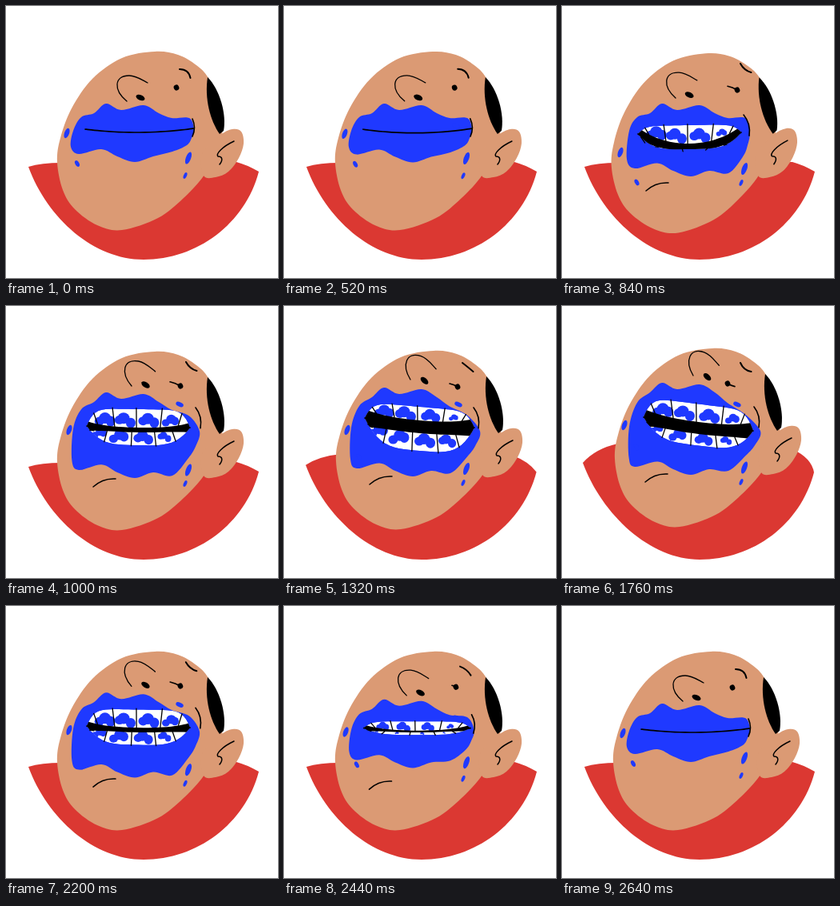
An HTML page with a canvas for the animation above (3.4 s loop, 340 px wide and 340 px high).

```html
<!DOCTYPE html>
<html lang="en">
<head>
<meta charset="utf-8">
<title>Foamy toothbrushing grin</title>
<style>
html, body { margin: 0; width: 100%; height: 100%; overflow: hidden; background: #fff; }
canvas { display: block; }
</style>
</head>
<body>
<canvas id="stage" width="340" height="340"></canvas>
<script>
const ctx = document.getElementById('stage').getContext('2d');
const LOOP = 3400, FRAME = 40;
const SKIN = '#db9a74', RED = '#db3832', BLUE = '#1f39ff', BLACK = '#000';

// shoulders: lift, spread | head: dx, dy, tilt | foam: lift above, drop below | corners: left, right
// jaws: upper arch, lower arch, sag of the gap, gap height | nose: x, y, tilt | eye: x, y, lash
// brow: x, y, bend | cheek: x, y, slant | chin: x, y | fleck: x, y
const closed = {
  shoulders: [0, 0], head: [0, 0, 0], foam: [0, 0], corners: [99, 154, 235, 153], jaws: [0, 0, 4.5, 0],
  nose: [151, 119, 0], eye: [213, 102, 0], brow: [217, 79, -7], cheek: [233, 141, 0], chin: [105, 231], fleck: [76, 159]
};
const opening = {
  ...closed, head: [-2, 6, 1.8], foam: [0, 18], corners: [95, 160, 224, 158], jaws: [10, 20, 18, 10],
  nose: [142, 115, 2], eye: [219, 105, -12], brow: [223, 72, 4], cheek: [227, 136, 7], fleck: [73, 183]
};
const grin = {
  shoulders: [.45, 0], head: [1, -1, 0], foam: [20, 18], corners: [101, 140, 238, 152], jaws: [20, 35, 5, 16],
  nose: [158, 92, 19], eye: [217, 101, -10], brow: [223, 71, 0], cheek: [237, 127, 6], chin: [107, 223], fleck: [79, 155]
};
const stretched = {
  shoulders: [1, 0], head: [2, -4, 0], foam: [26, 16], corners: [102, 139, 239, 156], jaws: [25, 27, 5, 15],
  nose: [164, 87, 20], eye: [207, 97, 9], brow: [223, 71, 5], cheek: [240, 126, 6], chin: [104, 220], fleck: [78, 149]
};
const easing = {
  ...grin, shoulders: [0, 0], head: [0, 0, 0], foam: [14, 20], corners: [101, 150, 230, 152], jaws: [22, 23, 4, 6],
  nose: [157, 100, 10], eye: [218, 100, -13], brow: [225, 70, 4], chin: [109, 226]
};
const shrug = { ...stretched, shoulders: [1.3, 10] };
const KEYS = [[0, closed], [480, closed], [840, opening], [1000, easing], [1040, easing], [1320, grin], [1440, shrug],
  [1560, grin], [1760, stretched], [1960, easing], [2160, easing], [2640, closed], [LOOP, closed]];

const points = text => text.split(' ').map(pair => pair.split(',').map(Number));
const headShape = points('186,57 215,61 238,74 253,90 267,122 269,172 248,211 222,240 190,265 145,280 114,274 86,254 71,230 64,195 68,165 82,128 108,91 145,65');
const earShape = points('267,162 283,154 294,157 297,172 291,190 278,207 262,214 247,212 245,185');
const foamTop = points('84,156 94,139 110,134 125,122 144,130 172,124 191,134 207,140 229,140');
const foamBottom = points('235,154 232,165 226,174 208,182 184,188 161,195 139,188 119,179 91,185 81,176');

const clamp = v => Math.max(0, Math.min(1, v));
const mix = (a, b, p) => a.map((v, i) => v + (b[i] - v) * p);

function poseAt(time) {
  const i = KEYS.findLastIndex(key => key[0] <= time);
  const [[t0, a], [t1, b]] = [KEYS[i], KEYS[i + 1]];
  const p = (time - t0) / (t1 - t0), eased = p * p * (3 - 2 * p);
  return Object.fromEntries(Object.keys(a).map(name => [name, mix(a[name], b[name], eased)]));
}

// Smooth closed curve through the points
function blob(pts) {
  const n = pts.length, path = new Path2D();
  path.moveTo(...pts[0]);
  for (let i = 0; i < n; i++) {
    const [p, q, r, s] = [n - 1, 0, 1, 2].map(k => pts[(i + k) % n]);
    path.bezierCurveTo(q[0] + (r[0] - p[0]) / 6, q[1] + (r[1] - p[1]) / 6,
      r[0] - (s[0] - q[0]) / 6, r[1] - (s[1] - q[1]) / 6, ...r);
  }
  return path;
}

const polygon = pts => new Path2D(`M${pts.join('L')}Z`);

function fill(path, color) {
  ctx.fillStyle = color;
  ctx.fill(path);
}

function stroke(d, width = 1.5) {
  ctx.lineWidth = width;
  ctx.stroke(new Path2D(d));
}

// Curved line from x, y; control and end are offsets
const arc = (x, y, control, end, width) =>
  stroke(`M${x} ${y}Q${x + control[0]} ${y + control[1]} ${x + end[0]} ${y + end[1]}`, width);

function oval(x, y, rx, ry, angle, color) {
  const path = new Path2D();
  path.ellipse(x, y, rx, ry, angle, 0, Math.PI * 2);
  fill(path, color);
}

// Draw in coordinates moved by x, y and turned around the origin
function placed(x, y, degrees, paint) {
  ctx.save();
  ctx.translate(x, y);
  ctx.rotate(degrees * Math.PI / 180);
  paint();
  ctx.restore();
}

function drawShoulders([lift, spread]) {
  const lx = 28 - 2 * lift - spread, ly = 201 - 5 * lift - spread / 2;
  const rx = 316 - lift + spread * 1.5, ry = 207 + lift - spread / 2;
  fill(new Path2D(`M${lx} ${ly}Q${lx + 16} ${196 - 18 * lift} 70 ${196 - 24 * lift}L288 ${195 - 16 * lift}
    Q${300 + 12 * lift} ${198 - 8 * lift} ${rx} ${ry}C${rx - 17} ${ry + 65} 239 317 172 317
    C110 317 ${lx + 24} ${ly + 65} ${lx} ${ly}Z`), RED);
}

function drawHead([dx, dy, tilt]) {
  placed(66 + dx, 200 + dy, -tilt, () => {
    ctx.translate(-66, -200);
    fill(blob(headShape), SKIN);
    fill(new Path2D('M252 89C267 104 276 135 272 156L267 160C255 143 248 115 252 89Z'), BLACK);
    fill(blob(earShape), SKIN);
    stroke('M285 169C270 176 262 185 265 188C271 188 271 193 267 198');
  });
}

function drawFoam([lift, drop], [fleckX, fleckY]) {
  const top = foamTop.map(([x, y]) => [x, y - lift * clamp((236 - x) / 40) * clamp((x - 80) / 20)]);
  const bottom = foamBottom.map(([x, y]) => {
    const drip = 1 + Math.exp(-(((x - 208) / 8) ** 2)) / 2;
    return [x + lift / 2 * clamp((180 - y) / 20), y + drop * drip * clamp((y - 150) / 30)];
  });
  fill(blob([...top, ...bottom]), BLUE);
  oval(fleckX, fleckY, 3, 6.5, .35, BLUE);
  oval(89 + drop / 4, 197 + 1.3 * drop - 1.6 * lift, 2.5, 4.2, -.5, BLUE);
  oval(228, 190 + .75 * drop, 3.2, 8, .35, BLUE);
  oval(224, 212 + drop / 2, 2, 4.2, .4, BLUE);
  oval(215 + lift * .15, 150 - 27 * clamp(lift / 14), 5, 2.8, .4, BLUE);
}

function drawMouth([lx, ly, rx, ry], [up, low, sag, height]) {
  // A point t of the way across, moved by an arch that flattens with its power
  const at = (t, arch, power, extra = 0) =>
    [lx + (rx - lx) * t, ly + (ry - ly) * t + arch * (1 - Math.abs(2 * t - 1) ** power) + extra];
  const upper = t => at(t, -up, 8), lower = t => at(t, low, 4);
  const gap = (t, side) => at(t, sag, 2, side * (height / 2 + 3 * (2 * t - 1) ** 4));
  const across = Array.from({ length: 33 }, (_, i) => (1 - Math.cos(i / 32 * Math.PI)) / 2);
  const back = across.toReversed();

  if (up + low > 6) {
    const inward = t => t + (.5 - t) * .08;
    const rows = [
      [.07, .25, .48, .73, .92].map(t => [upper(t), gap(inward(t), -1)]),
      [.03, .17, .43, .67, .86].map(t => [lower(t), gap(inward(t), 1)])];
    const mouth = polygon([...across.map(upper), ...back.map(lower)]);
    ctx.save();
    ctx.clip(mouth);
    fill(mouth, '#fff');
    rows.forEach((row, side) => row.slice(1).forEach(([gum, edge], i) => {
      const [x, y] = mix(mix(row[i][1], edge, .5), mix(row[i][0], gum, .5), .4);
      const s = clamp(Math.abs(edge[1] - gum[1]) / 17), wobble = 2 * Math.sin(5 * i + 2 * side);
      oval(x - 7 * s, y + (2 + wobble) * s, 6 * s, 5.5 * s, 0, BLUE);
      oval(x + wobble * s, y - 2 * s, 7.5 * s, 7 * s, 0, BLUE);
      oval(x + 7 * s, y + (2 - wobble) * s, 6 * s, 6.5 * s, 0, BLUE);
    }));
    fill(polygon([...across.map(t => gap(t, -1)), ...back.map(t => gap(t, 1))]), BLACK);
    ctx.restore();
    rows.flat().forEach(([gum, edge]) => stroke(`M${mix(edge, gum, 1.06)}L${edge}`, 1.3));
  }
  stroke(`M${across.map(t => at(t, sag, 2)).join('L')}`, 1.7);
}

function drawFace({ nose, eye: [x, y, lash], brow: [bx, by, bend], cheek: [cx, cy, slant], chin, jaws }) {
  placed(...nose, () => {
    stroke('M0 0C-17 -14 -16 -32 3 -32C12 -32 20 -26 26 -23', 1.3);
    oval(17, -4.5, 5.8, 3.3, .4, BLACK);
  });
  oval(x, y, 3.3, 3.6, -.4, BLACK);
  arc(x, y, [lash / 2, lash * .3], [lash, lash * .4], 1.6);
  arc(bx, by, [7 - bend * .6, 5.5 + bend * .8], [13.5, 11], 2);
  arc(cx, cy, [slant * .6 + 5, 11], [slant, 22 + slant * .6], 1.6);
  if (jaws[1] > 4) arc(...chin, [12, -11], [28, -10]);
}

function draw(time) {
  const pose = poseAt(time);
  ctx.clearRect(0, 0, 340, 340);
  ctx.strokeStyle = BLACK;
  ctx.lineCap = ctx.lineJoin = 'round';
  drawShoulders(pose.shoulders);
  drawHead(pose.head);
  drawFoam(pose.foam, pose.fleck);
  drawMouth(pose.corners, pose.jaws);
  drawFace(pose);
}

function tick(now) {
  const time = now % LOOP;
  draw(time - time % FRAME);
  requestAnimationFrame(tick);
}
requestAnimationFrame(tick);
</script>
</body>
</html>
```
